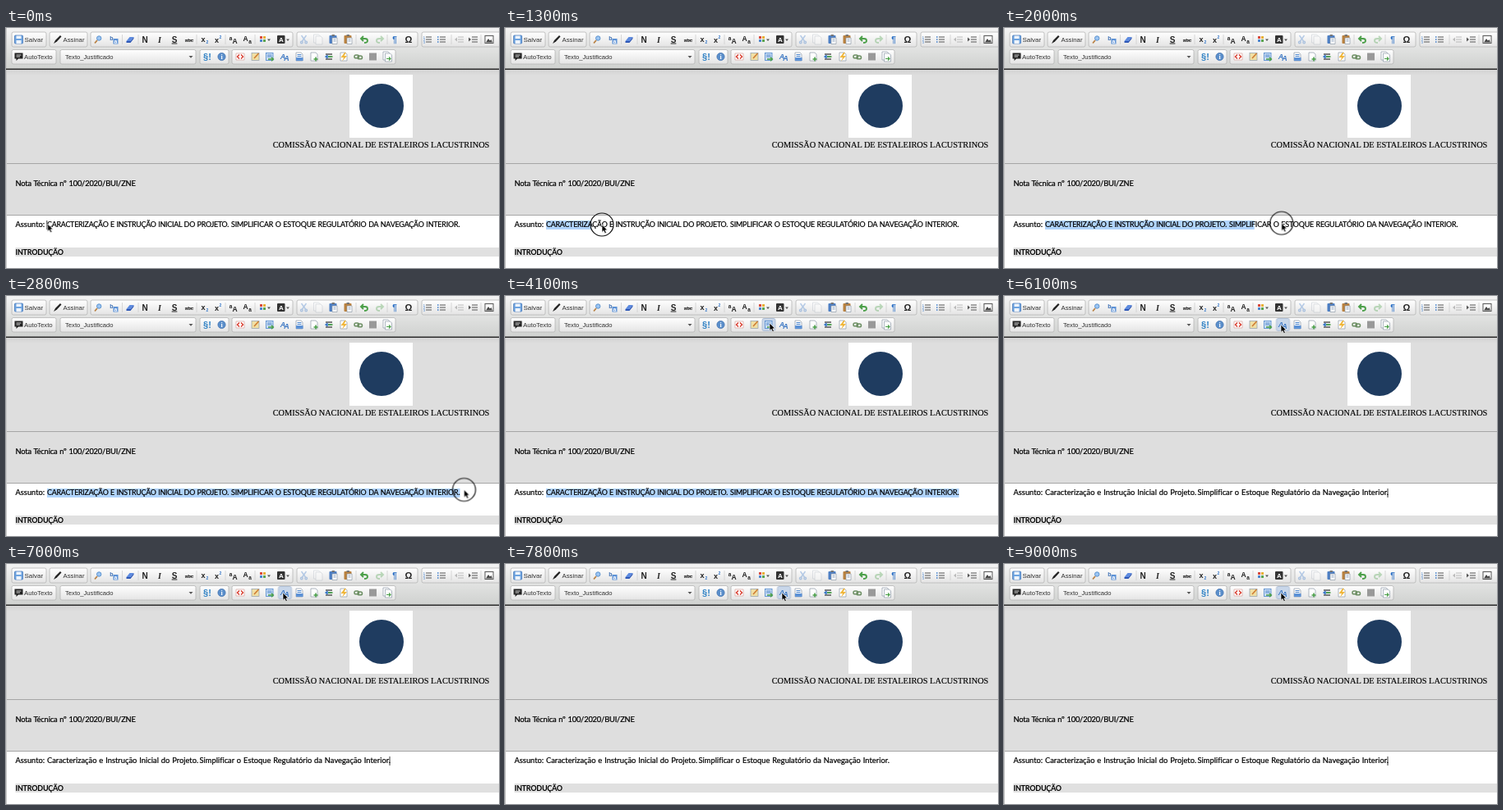
An HTML page for the animation above (9100 ms loop, 600 by 293 pixels).

```html
<!DOCTYPE html>
<html lang="pt-BR">
<head>
<meta charset="utf-8">
<title>Editor de texto</title>
<style>
html, body { margin: 0; width: 100%; height: 100%; overflow: hidden; background: #fff; }
svg { display: block; width: 600px; height: 293px; }
text { white-space: pre; }

.body { font: 9.3px Lato, Carlito, sans-serif; word-spacing: .5px; letter-spacing: .02px; stroke: #000; stroke-width: .22; }
.ref { letter-spacing: -.16px; }
.caps { font-size: 8.9px; letter-spacing: -.16px; }
.tight { letter-spacing: -.23px; }
.head { font: bold 9px Lato, Carlito, sans-serif; letter-spacing: -.24px; }
.agency { font: 10.35px "Liberation Serif", serif; text-anchor: middle; stroke: #000; stroke-width: .15; }
.ui { font: 7.8px "Liberation Sans", Arial, sans-serif; fill: #333; }
.mid { text-anchor: middle; }
.box { fill: url(#button); stroke: #b5b5b5; stroke-width: .8; }
.rule { stroke: #cfcfcf; stroke-width: .8; }
.ink { fill: none; stroke: #555; stroke-width: 1; }
.blue { fill: none; stroke: #3a78c8; stroke-width: 1.4; }
.page { fill: #fff; stroke: #8d9aa8; stroke-width: .7; }
.faded { opacity: .35; }

.pointer, .ring, .sel, .before, .after, .start, .hover1, .hover2 {
  animation: 9.1s step-end infinite;
}
.pointer { animation-name: move; }
.ring { animation-name: press; }
.sel { animation-name: select; }
.before { animation-name: leave; }
.after { animation-name: enter; }
.start { animation-name: start; }
.hover1 { animation-name: hover1; }
.hover2 { animation-name: hover2; }
/* Offset so that the caret is lit as the new text appears. */
.blink { animation: blink 1s -.1002s step-end infinite; }

@keyframes move {
  0% { transform: translate(50.5px, 239px); }
  8.79% { transform: translate(50.5px, 239px); animation-timing-function: steps(5); }
  14.28% { transform: translate(118px, 240px); animation-timing-function: steps(14); }
  29.66% { transform: translate(557.5px, 236.5px); }
  35.16% { transform: translate(557.5px, 236.5px); animation-timing-function: steps(2); }
  37.36% { transform: translate(520px, 204px); animation-timing-function: steps(4); }
  41.75% { transform: translate(350px, 58px); animation-timing-function: steps(2); }
  43.95% { transform: translate(322px, 33px); }
  47.25% { transform: translate(322px, 33px); animation-timing-function: steps(4); }
  51.64%, 100% { transform: translate(337px, 35px); }
}
@keyframes press {
  0% { opacity: 0; }
  7.69% { opacity: 1; }
  34.06% { opacity: 0; }
  61.53% { opacity: 1; }
  64.83%, 100% { opacity: 0; }
}
@keyframes select {
  0% { width: 0; }
  9.89% { width: 0; animation-timing-function: steps(5); }
  15.38% { width: 69px; animation-timing-function: steps(14); }
  30.76% { width: 502.5px; }
  64.83%, 100% { width: 0; }
}
@keyframes leave { 0% { opacity: 1; } 64.83%, 100% { opacity: 0; } }
@keyframes enter { 0% { opacity: 0; } 64.83%, 100% { opacity: 1; } }
@keyframes start { 0% { opacity: 1; } 9.89%, 100% { opacity: 0; } }
@keyframes hover1 { 0% { opacity: 0; } 42.85% { opacity: 1; } 49.45%, 100% { opacity: 0; } }
@keyframes hover2 { 0% { opacity: 0; } 49.45%, 100% { opacity: 1; } }
@keyframes blink { 0% { opacity: 1; } 50%, 100% { opacity: 0; } }
</style>
</head>
<body>
<svg viewBox="0 0 600 293">
  <defs>
    <linearGradient id="bar" x2="0" y2="1">
      <stop stop-color="#f3f3f3"/><stop offset="1" stop-color="#cfd1cf"/>
    </linearGradient>
    <linearGradient id="button" x2="0" y2="1">
      <stop stop-color="#fff"/><stop offset="1" stop-color="#e4e4e4"/>
    </linearGradient>
    <linearGradient id="shade" x2="0" y2="1">
      <stop stop-color="#d3d3d3"/><stop offset="1" stop-color="#dfdfdf"/>
    </linearGradient>
    <path id="sheet" class="page" d="M-4-5H2L4-3V5H-4Z"/>
    <path id="lines" class="ink" d="M-2-3H5M-2 0H5M-2 3H5"/>
    <path id="curl" fill="none" stroke-width="1.9" d="M-3-1H1Q4-1 4 1.5T0 4M-1-4L-4-1-1 2"/>
    <rect id="lit" x="-8" y="-7.5" width="16" height="15" rx="2" fill="#c9d7ea" stroke="#9fb3ce" stroke-width=".7"/>
    <g id="clip">
      <rect x="-4.5" y="-5" width="9" height="10" rx="1"/>
      <path d="M-1.5-6H2V-4H-1.5Z" fill="#777"/>
      <path class="page" d="M-1-2H5V5.5H-1Z"/>
      <path d="M.5 0H3.5M.5 2H3.5" stroke="#7c93b0" stroke-width=".8"/>
    </g>
  </defs>

  <!-- Page -->
  <rect width="600" height="293" fill="#fff"/>
  <rect y="50" width="600" height="179" fill="#dedede"/>
  <rect y="51" width="600" height="8" fill="url(#shade)"/>
  <path d="M0 165.5H600M0 228.5H600" stroke="#a6a6a6"/>
  <rect x="418" y="57" width="77" height="77" fill="#fff"/>
  <circle cx="457" cy="95" r="27" fill="#1f3c60"/>
  <text class="agency" x="456.5" y="145.5">COMISSÃO NACIONAL DE ESTALEIROS LACUSTRINOS</text>
  <text class="body ref" x="11.5" y="193">Nota Técnica nº 100/2020/BUI/ZNE</text>

  <rect class="sel" x="50" y="235" width="0" height="11" fill="#afd3fb"/>
  <text class="body" x="11.5" y="243.4">Assunto:</text>
  <text class="body caps before" y="243.4"><tspan class="tight" x="50">CARACTERIZAÇÃO E INSTRUÇÃO INICIAL DO PROJETO.</tspan><tspan x="274">SIMPLIFICAR O ESTOQUE REGULATÓRIO DA NAVEGAÇÃO INTERIOR.</tspan></text>
  <text class="body after" y="243.4"><tspan x="50">Caracterização e Instrução Inicial do Projeto.</tspan><tspan x="235.5">Simplificar o Estoque Regulatório da Navegação Interior.</tspan></text>
  <path class="start" d="M49.8 235V246" stroke="#000" stroke-width=".8"/>
  <g class="after"><path class="blink" d="M467 235V246" stroke="#000" stroke-width=".8"/></g>

  <rect x="11.5" y="268" width="589" height="11" fill="#e0e0e0"/>
  <text class="head" x="11.5" y="276.5">INTRODUÇÃO</text>

  <!-- Toolbar -->
  <rect width="600" height="50" fill="url(#bar)"/>
  <path d="M.5 0V293" stroke="#c8c8c8"/>
  <path d="M0 50.2H600" stroke="#2b2b2b" stroke-width="1.5"/>
  <g class="box">
    <rect x="7" y="5" width="42" height="18" rx="2"/>
    <rect x="53" y="5" width="46" height="18" rx="2"/>
    <rect x="103" y="5" width="246" height="18" rx="2"/>
    <rect x="354" y="5" width="147" height="18" rx="2"/>
    <rect x="506" y="5" width="100" height="18" rx="2"/>
    <rect x="7" y="26.5" width="54" height="17.5" rx="2"/>
    <rect x="66" y="26.5" width="165" height="17.5" rx="2"/>
    <rect x="236" y="26.5" width="35" height="17.5" rx="2"/>
    <rect x="275" y="26.5" width="199" height="17.5" rx="2"/>
  </g>
  <path class="rule" d="M141.5 8V20M161 8V20M232 8V20M267 8V20M303 8V20M426 8V20M464 8V20M542 8V20M578 8V20"/>

  <g class="ui">
    <text x="22.5" y="17" style="font-size:8px">Salvar</text>
    <text x="69.5" y="17">Assinar</text>
    <text x="22" y="38">AutoTexto</text>
    <text x="72" y="38" style="font-size:7.65px">Texto_Justificado</text>
  </g>
  <path d="M222.5 34H227.5L225 36.8Z" fill="#555"/>

  <!-- Save, sign, snippet -->
  <rect x="10.5" y="9" width="10" height="10" rx="1" fill="#6ea4e0" stroke="#3a6fb4" stroke-width=".7"/>
  <path d="M12.5 9.5H18.5V13H12.5ZM12.5 15H18.5V19H12.5Z" fill="#eef4fb"/>
  <path d="M58 19L60 15 66 9 67.5 10.5 62 16.5Z" fill="#222"/>
  <path d="M10.5 30.5H20.5V37.5H15L12.5 40V37.5H10.5Z" fill="#222"/>
  <path d="M12.5 33H18.5M12.5 35H17" stroke="#fff" stroke-width=".8"/>

  <!-- Row one: find, replace, erase -->
  <g transform="translate(112 14)">
    <path d="M-1 1L-4 4.5" stroke="#b98246" stroke-width="1.8"/>
    <circle cx="1.2" cy="-1.5" r="2.7" fill="#9cc5f2" stroke="#5b92cf"/>
  </g>
  <rect x="130.5" y="13" width="6" height="6.5" fill="#5d92d6"/>
  <g class="mid" style="font:bold 7px 'Liberation Sans',sans-serif">
    <text x="128.5" y="14.5" fill="#3c6fb3">b</text><text x="133.5" y="18.5" fill="#fff">a</text>
  </g>
  <path d="M146.5 16L150.5 11H155.5L151.5 16Z" fill="#5d8be0"/>
  <path d="M146.5 16H151.5V18H146.5ZM151.5 16L155.5 11V13L151.5 18Z" fill="#2e57b5"/>

  <!-- Row one: character styles -->
  <g class="mid" fill="#222" style="font:bold 10px 'Liberation Sans',sans-serif">
    <text x="169" y="17.5">N</text>
    <text x="187" y="17.5" style="font:italic bold 10px 'Liberation Serif',serif">I</text>
    <text x="205" y="17.5" text-decoration="underline">S</text>
    <text x="223" y="16.5" style="font-size:6px" text-decoration="line-through">abc</text>
    <text x="240" y="17" style="font-size:9px">x</text>
    <text x="256.5" y="18" style="font-size:9px">x</text>
    <text x="273.5" y="14.5" style="font-size:6.5px">a</text>
    <text x="278.5" y="19" style="font-size:8.5px">A</text>
    <text x="291.5" y="15.5" style="font-size:8.5px">A</text>
    <text x="297" y="19" style="font-size:6.5px">a</text>
    <text x="490" y="18" style="font-size:11px">Ω</text>
    <g fill="#3878c8">
      <text x="244.8" y="19" style="font-size:5px">2</text>
      <text x="261" y="13" style="font-size:5px">2</text>
      <text x="473" y="17.5">¶</text>
    </g>
  </g>
  <g>
    <path d="M309 10H312V13H309Z" fill="#d84a3e"/><path d="M313 10H316V13H313Z" fill="#e9b036"/>
    <path d="M309 14H312V17H309Z" fill="#4d87d0"/><path d="M313 14H316V17H313Z" fill="#5ba553"/>
    <path d="M318 13.5H322L320 16ZM341 13.5H345L343 16Z" fill="#555"/>
    <rect x="330" y="9" width="9.5" height="10" rx="1" fill="#333"/>
    <text class="mid" x="334.8" y="17" fill="#fff" style="font:bold 8px 'Liberation Sans',sans-serif">A</text>
  </g>

  <!-- Row one: clipboard and history -->
  <g class="faded">
    <path class="blue" d="M359.5 9L364.5 16M365.5 9L360.5 16"/>
    <circle class="blue" cx="359.8" cy="17.5" r="1.3"/><circle class="blue" cx="365.2" cy="17.5" r="1.3"/>
    <use href="#sheet" x="378.5" y="13"/><use href="#sheet" x="381" y="15"/>
  </g>
  <use href="#clip" x="398" y="14" fill="#4d7fc4"/>
  <use href="#clip" x="416" y="14" fill="#b9813f"/>
  <use href="#curl" x="436" y="14" stroke="#4ca04a"/>
  <use class="faded" href="#curl" transform="translate(455 14) scale(-1 1)" stroke="#4ca04a"/>

  <!-- Row one: lists, indents, picture -->
  <use href="#lines" x="513" y="14"/>
  <text style="font:4px 'Liberation Sans',sans-serif" fill="#3878c8"><tspan x="507.8" y="12.5">1</tspan><tspan x="507.8" y="15.5">2</tspan><tspan x="507.8" y="18.5">3</tspan></text>
  <use href="#lines" x="530" y="14"/>
  <path d="M525 11H526.5M525 14H526.5M525 17H526.5" stroke="#3878c8" stroke-width="1.5"/>
  <g class="faded">
    <use href="#lines" x="552" y="14"/><path d="M549 11.5L546 14 549 16.5Z" fill="#555"/>
  </g>
  <use href="#lines" x="569" y="14"/><path d="M563 11.5L566 14 563 16.5Z" fill="#555"/>
  <rect x="583" y="9.5" width="10" height="9" fill="#fff" stroke="#555"/>
  <path d="M584 17.5L587 13 589 15.5 590.5 14 592 17.5Z" fill="#444"/>

  <!-- Row two -->
  <text class="mid" x="245" y="39" fill="#2b7fc4" style="font:bold 11px 'Liberation Sans',sans-serif">§!</text>
  <circle cx="262.5" cy="35" r="4.6" fill="#5b8fcb" stroke="#3c6cab" stroke-width=".7"/>
  <text class="mid" x="262.5" y="38" fill="#fff" style="font:bold 8px 'Liberation Serif',serif">i</text>
  <use class="hover1" href="#lit" x="321" y="35"/>
  <use class="hover2" href="#lit" x="339.5" y="35"/>
  <path d="M280 31H290V39H280Z" fill="#fff" stroke="#d9a39d" stroke-width=".7"/>
  <path d="M284 32.5L281.5 35 284 37.5M286 32.5L288.5 35 286 37.5" fill="none" stroke="#d8392b" stroke-width="1.4"/>
  <rect x="299" y="30.5" width="9" height="9" fill="#f0dfa4" stroke="#8f9dad" stroke-width=".7"/>
  <path d="M302 37L307.5 31" stroke="#cf7c32" stroke-width="1.6"/>
  <rect x="316.5" y="30.5" width="8.5" height="9" fill="#cfe0f4" stroke="#4a84cc" stroke-width=".8"/>
  <path d="M318 33H323.5M318 35H323.5" stroke="#4a84cc"/>
  <path d="M319 38H325M323 35.8L325.5 38 323 40.2" fill="none" stroke="#4ca04a" stroke-width="1.3"/>
  <g class="mid" fill="#3d78c4" style="font:italic bold 9px 'Liberation Sans',sans-serif">
    <text x="337" y="38">A</text><text x="341.5" y="39.5">A</text>
  </g>
  <use href="#sheet" x="357" y="35"/>
  <path d="M354.5 32.5H359.5M354.5 34.5H359.5" stroke="#4a84cc"/>
  <rect x="353" y="36" width="8.5" height="4" fill="#5d92d6"/>
  <use href="#sheet" x="375" y="35"/>
  <path d="M374.5 38H379.5M377 35.5V40.5" stroke="#4ca04a" stroke-width="1.6"/>
  <path d="M389 32H397M389 38H397" stroke="#555" stroke-width="1.3"/>
  <path class="blue" d="M396 35H389M391.5 33L389 35 391.5 37"/>
  <path d="M392 35H397.5" stroke="#4ca04a" stroke-width="1.8"/>
  <use href="#sheet" x="411" y="35"/>
  <path d="M412 30L407.5 36H411L409 40.5 415 34H411.5L414 30Z" fill="#f0b63a"/>
  <g fill="none" stroke="#6d8f64" stroke-width="1.5">
    <rect x="424" y="33" width="5.5" height="3.8" rx="1.9"/>
    <rect x="428" y="34" width="5.5" height="3.8" rx="1.9"/>
  </g>
  <rect x="442" y="30.5" width="9" height="9" fill="#999"/>
  <use href="#sheet" x="463" y="34"/><use href="#sheet" x="465.5" y="36"/>
  <path d="M463 37.5H468M466 35.5L468 37.5 466 39.5" fill="none" stroke="#4ca04a" stroke-width="1.2"/>

  <!-- Pointer -->
  <g class="pointer">
    <circle class="ring" r="14" fill="none" stroke="#111" stroke-width="1.2"/>
    <path d="M0 0V9.4L2.1 7.4 3.7 10.8 5.4 10 3.9 6.8H6.7Z" fill="#000" stroke="#fff" stroke-width=".7"/>
  </g>
</svg>
</body>
</html>
```
